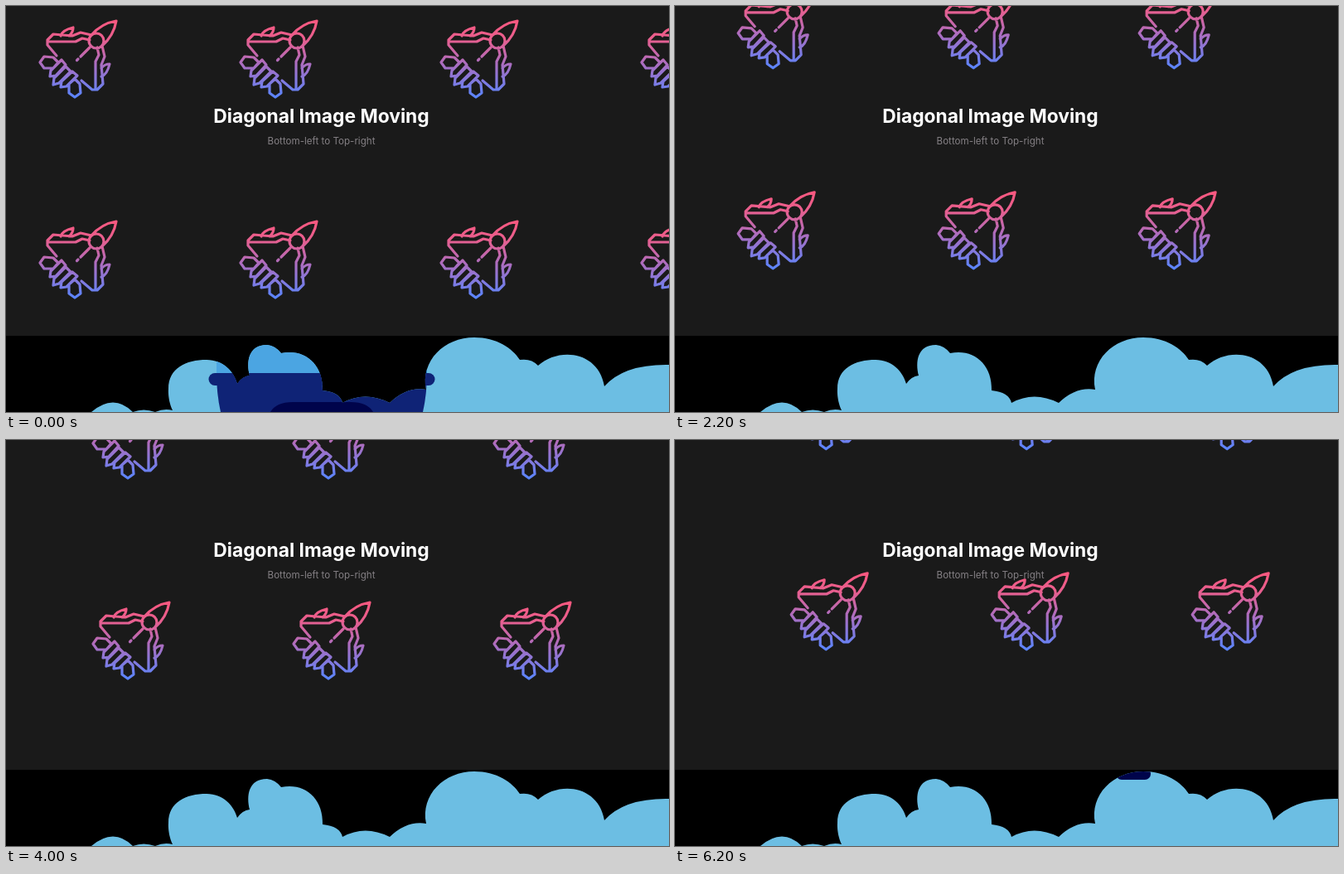
Recreate the animation shown at these times as an HTML page with a canvas. Size 800x490 px, loop 6300 ms.

```html
<!DOCTYPE html>
<html lang="en">
<head>
<meta charset="utf-8">
<title>Diagonal Image Moving</title>
<style>
  html, body { margin: 0; width: 100%; height: 100%; overflow: hidden; background: #000; }
  canvas { display: block; width: 800px; height: 490px; }
</style>
</head>
<body>
<canvas id="stage" width="800" height="490"></canvas>
<script>
const ctx = document.getElementById('stage').getContext('2d');
const LOOP = 6300, STEP = 100, TILE = 242, DRIFT = 0.016;
const PANEL_BOTTOM = 398, AXIS = 381, FALL = 1.2;
const LIGHT = '#4ba5e2', BLUE = '#1d80d9', NAVY = '#0f2376', DEEP = '#00044b';

// One side of the jet; the other side is its mirror image across x + y = 151.
const jetSide = new Path2D(`
  M133 18 C121 20 110 27 103 35 L90 32 L80 36 L57 34 L50 41 V47 L61 60
  M50 43 L84 43 L92 39 L101 41
  M66 36 Q68 29 81 26 Q81 32 76 36
  M41 68 L46 61 L57 62 L63 68 L57 75 L46 75 Z
  M53 85 L54 78 L67 65 L72 71 L60 84 Z`);
const jetMiddle = new Path2D(`
  M118 42 A9 9 0 1 1 100 42 A9 9 0 1 1 118 42
  M57 95 L58 87 L72 73 L78 79 L64 93 Z
  M90 61 L101 50 M85.5 65.5 L87 64`);

const clouds = new Path2D(`
  M103 490 Q130 467 153 490 Q166 485 180 490 Q191 485 201 488
  C195 475 196 463 196 462 C196 437 217 427 242 427 C262 427 275 441 279 456
  Q285 447 294 446 C290 430 292 409 315 409 Q325 410 332 419
  C360 413 383 432 382 464 Q403 466 406 479 Q433 464 463 479
  Q484 459 507 463 C500 428 529 400 565 400 C592 400 611 413 620 427
  Q634 425 642 434 C668 411 715 417 722 459 Q746 432 800 433 V490 Z`);

function jetGradient() {
  const g = ctx.createLinearGradient(0, 17, 0, 112);
  g.addColorStop(0, '#f9587f');
  g.addColorStop(0.25, '#e75f8f');
  g.addColorStop(0.55, '#ac6dbf');
  g.addColorStop(1, '#5786ff');
  return g;
}
const jetPaint = jetGradient();

// Mirroring happens in the geometry so that the gradient stays vertical.
const jet = new Path2D(jetMiddle);
jet.addPath(jetSide);
jet.addPath(jetSide, new DOMMatrix([0, -1, -1, 0, 151, 151]));

function drawJets(shift) {
  for (let row = 0; row < 3; row++) {
    for (let col = -1; col < 4; col++) {
      ctx.save();
      ctx.translate(col * TILE + shift, row * TILE - shift);
      ctx.stroke(jet);
      ctx.restore();
    }
  }
}

function label(text, y, font, color) {
  ctx.font = font;
  ctx.fillStyle = color;
  ctx.fillText(text, 380.5, y);
}

function drawPanel(t) {
  ctx.save();
  ctx.beginPath();
  ctx.rect(0, 0, 800, PANEL_BOTTOM);
  ctx.clip();
  ctx.fillStyle = '#1a1a1a';
  ctx.fillRect(0, 0, 800, PANEL_BOTTOM);
  ctx.strokeStyle = jetPaint;
  ctx.lineWidth = 3.2;
  ctx.lineJoin = ctx.lineCap = 'round';
  drawJets(t * DRIFT);
  ctx.textAlign = 'center';
  label('Diagonal Image Moving', 141, '700 22.8px Inter, sans-serif', '#fff');
  label('Bottom-left to Top-right', 167, '400 11.6px Inter, sans-serif', '#858085');
  ctx.restore();
}

function pill(x, y, halfWidth, height, color) {
  ctx.fillStyle = color;
  ctx.beginPath();
  ctx.roundRect(x - halfWidth, y, halfWidth * 2, height, height / 2);
  ctx.fill();
}

function shape(path, color) {
  ctx.fillStyle = color;
  ctx.fill(new Path2D(path));
}

// Vertical positions are relative to the rim at the base of the hull.
function drawCraft(t) {
  ctx.save();
  ctx.translate(AXIS, 443 + FALL * t);
  ctx.fillStyle = '#080c24';
  ctx.fillRect(-8, -1756, 15, 890);
  pill(0, -1798, 64, 15, NAVY);
  pill(0, -1769, 221, 14, NAVY);
  shape('M0 -875 A127 151 0 0 0 -127 -724 V0 H0 Z', LIGHT);
  shape('M0 -875 A127 151 0 0 1 127 -724 V0 H0 Z', BLUE);
  shape('M-127 0 H127 Q127 35 117 65 H-117 Q-127 35 -127 0', NAVY);
  pill(0, 0, 136.5, 15, NAVY);
  shape('M-62 47 Q-55 35 -35 35 H35 Q55 35 62 47 L68 80 H-68 Z', DEEP);
  pill(-172, 73, 21, 14, DEEP);
  pill(172, 73, 21, 14, DEEP);
  ctx.restore();
}

function drawSky(t) {
  ctx.fillStyle = '#000';
  ctx.fillRect(0, PANEL_BOTTOM, 800, 92);
  ctx.fillStyle = '#6cbee3';
  ctx.fill(clouds);
  ctx.save();
  ctx.clip(clouds);
  drawCraft(t > LOOP - 500 ? t - LOOP : t);
  ctx.restore();
}

function frame() {
  const t = Math.floor(performance.now() % LOOP / STEP) * STEP;
  drawSky(t);
  drawPanel(t);
  requestAnimationFrame(frame);
}
frame();
</script>
</body>
</html>
```
